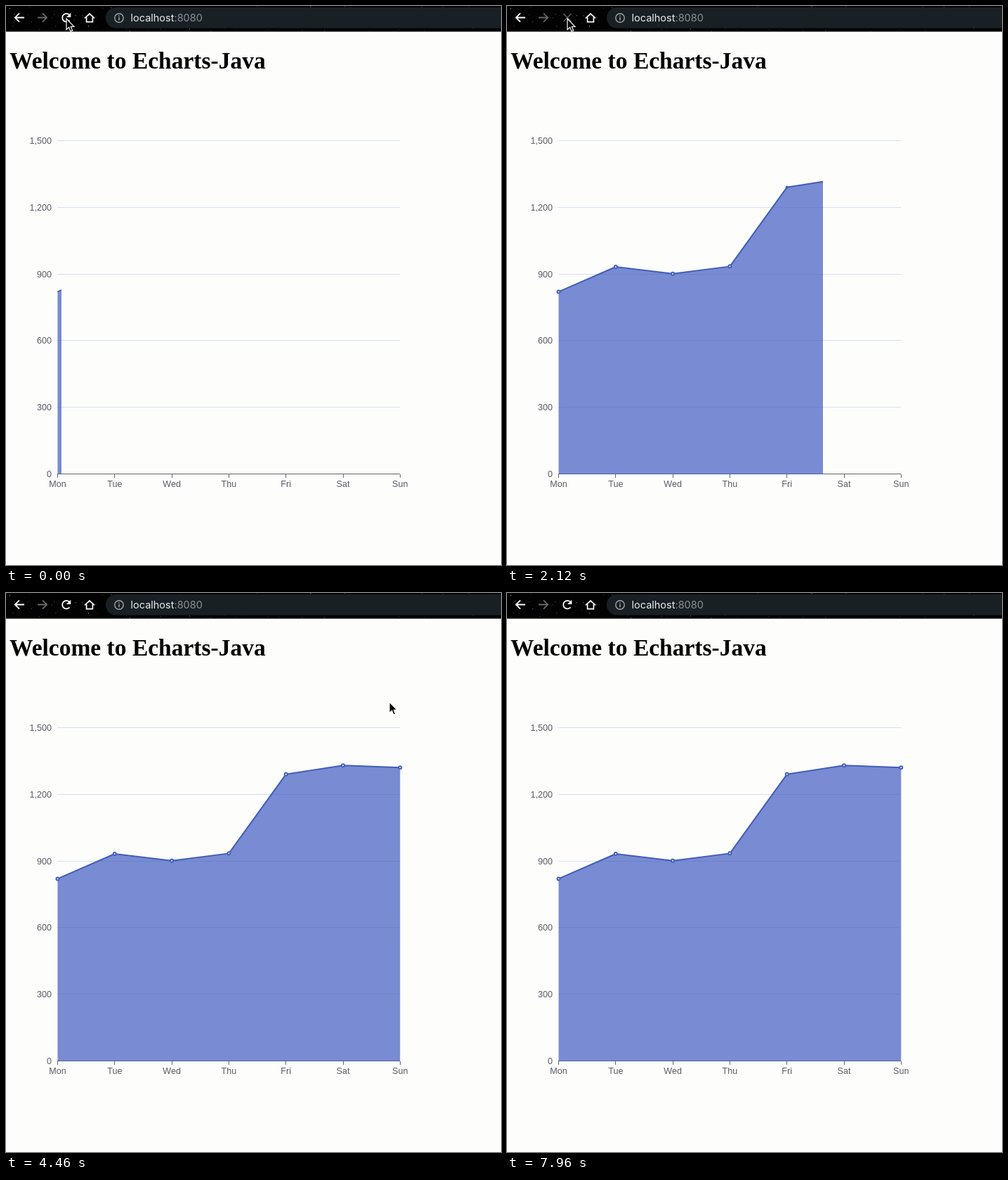
These frames come from a looping animation (705x795 px, 8060 ms). An HTML page:

```html
<!DOCTYPE html>
<html lang="en">
<head>
<meta charset="utf-8">
<title>Area chart</title>
<style>
  html, body { margin: 0; width: 100%; height: 100%; overflow: hidden; background: #fdfdfc; }
  svg { display: block; }
  .label { font: 12.6px "Liberation Sans", Arial, sans-serif; fill: #5a5c64; }
  .url { font: 14.5px Inter, Roboto, sans-serif; fill: #e9ebec; }
  .title { font: bold 33.5px "Liberation Serif", Times, serif; }
  .icon { fill: none; stroke: #fff; stroke-width: 1.8; }
</style>
</head>
<body>
<svg width="705" height="795" viewBox="0 0 705 795">
  <defs><clipPath id="clip"><rect id="reveal" x="72.5" y="150" height="516"/></clipPath></defs>

  <rect width="705" height="36.5" fill="#020203"/>
  <g id="stars"></g>
  <rect x="142" y="2" width="600" height="29.5" rx="14.7" fill="#192023"/>
  <path class="icon" d="M26 16.5H13M19 10.3L12.8 16.5 19 22.7"/>
  <path class="icon" style="stroke:#66686b" d="M45 16.5H58M52 10.3L58.2 16.5 52 22.7"/>
  <g id="reload">
    <path class="icon" d="M90.6 20.2A5.8 5.8 0 1 1 90.2 12.6"/>
    <path fill="#fff" d="M92.3 9.8V16H86Z"/>
  </g>
  <path id="stop" class="icon" style="stroke:#5c5e60;stroke-width:1.5" d="M80.5 11L91.5 22M91.5 11L80.5 22"/>
  <path class="icon" style="stroke-width:1.7" d="M112 17.3L119 11 126 17.3M114.6 16V22.7H123.4V16"/>
  <circle class="icon" cx="161" cy="17" r="6.2" style="stroke:#a0a4a7;stroke-width:1.4"/>
  <path class="icon" style="stroke:#a0a4a7;stroke-width:1.5" d="M161 16V20.3M161 13.4V14.9"/>
  <text class="url" x="177.5" y="22">localhost<tspan fill="#8b9093">:8080</tspan></text>

  <text class="title" x="5" y="89">Welcome to Echarts-Java</text>
  <g id="axes"></g>
  <g clip-path="url(#clip)">
    <path id="area" fill="rgba(66,92,192,.7)"/>
    <path id="line" fill="none" stroke="#415eba" stroke-width="2" stroke-linejoin="bevel"/>
  </g>
  <g id="dots" fill="#fff" stroke="#415eba" stroke-width="2"></g>
  <path id="cursor" d="M0 0V15.6L3.6 12.3 6 18 8.7 16.9 6.3 11.4H11Z" stroke="#fff" stroke-width="1.2"/>
</svg>
<script>
const LOOP = 8060, LEFT = 73.5, BASE = 665.7, STEP = 81.3;
const days = ['Mon', 'Tue', 'Wed', 'Thu', 'Fri', 'Sat', 'Sun'];
const values = [820, 932, 901, 934, 1290, 1330, 1320];
const $ = id => document.getElementById(id);
const px = i => LEFT + i * STEP;
const py = v => BASE - v * 0.3162;

function add(parent, tag, attrs, text = '') {
  const el = document.createElementNS('http://www.w3.org/2000/svg', tag);
  for (const key in attrs) el.setAttribute(key, attrs[key]);
  el.textContent = text;
  return parent.appendChild(el);
}

// Night-sky toolbar
let seed = 11;
const random = () => (seed = seed * 16807 % 2147483647) / 2147483647;
for (let i = 0; i < 190; i++) {
  add($('stars'), 'circle', {
    cx: random() * 705, cy: random() * 36, r: 0.3 + random() * 0.5,
    fill: ['#8a93b8', '#777', '#5b6790', '#b9b4c4'][i % 4], opacity: 0.3 + random() * 0.6
  });
}

// Grid, axis and labels
for (let v = 0; v <= 1500; v += 300) {
  const y = Math.floor(py(v)) + 0.5;
  add($('axes'), 'path', { d: `M73 ${y}H561`, stroke: v ? '#d5dff0' : '#62656d' });
  add($('axes'), 'text', { class: 'label', x: 65, y: y + 4.3, 'text-anchor': 'end' }, v.toLocaleString('en-US'));
}
days.forEach((day, i) => {
  add($('axes'), 'path', { d: `M${Math.floor(px(i)) + 0.5} 666v5`, stroke: '#62656d' });
  add($('axes'), 'text', { class: 'label', x: px(i), y: 684.3, 'text-anchor': 'middle' }, day);
});

const outline = 'M' + values.map((v, i) => `${px(i)} ${py(v)}`).join('L');
$('line').setAttribute('d', outline);
$('area').setAttribute('d', `${outline}V${BASE}H${LEFT}Z`);
const dots = values.map((v, i) => add($('dots'), 'circle', { cx: px(i), cy: py(v) }));

// Linear interpolation through [input, ...outputs] rows
function track(rows, t, ease = k => k) {
  const i = rows.findIndex(row => row[0] > t);
  if (i < 0) return rows[rows.length - 1].slice(1);
  if (!i) return rows[0].slice(1);
  const a = rows[i - 1], b = rows[i];
  const k = ease((t - a[0]) / (b[0] - a[0]));
  return a.slice(1).map((v, j) => v + (b[j + 1] - v) * k);
}
const smooth = k => k * k * (3 - 2 * k);

const growth = [[0, 5.5], [29, 237], [46, 376.5], [60, 489]];
const moves = [[3500, 86, 18], [4300, 546, 155], [5200, 546, 155], [5900, 708, 190]];

// Ticks advance in an uneven 20, 100, 20 ms rhythm
function tickAt(t) {
  const m = t % 140;
  return 3 * Math.floor(t / 140) + (m < 20 ? 0 : m < 120 ? 1 : 2);
}

function draw(t) {
  const tick = tickAt(t);
  const [width] = track(growth, tick);
  $('reveal').setAttribute('width', width + 1);

  dots.forEach((dot, i) => {
    const scale = Math.min(1, (tick - i * 10) / 12);
    dot.setAttribute('r', Math.max(0, 2 * scale));
    dot.style.display = scale > 0 ? '' : 'none';
  });

  const loading = t >= 120 && t < 3600;
  $('reload').style.display = loading ? 'none' : '';
  $('stop').style.display = loading ? '' : 'none';

  const [x, y] = track(moves, t, smooth);
  $('cursor').setAttribute('transform', `translate(${x} ${y})`);
  $('cursor').style.display = t < 5900 ? '' : 'none';
}

const start = performance.now();
function frame() {
  draw((performance.now() - start) % LOOP);
  requestAnimationFrame(frame);
}
frame();
</script>
</body>
</html>
```
